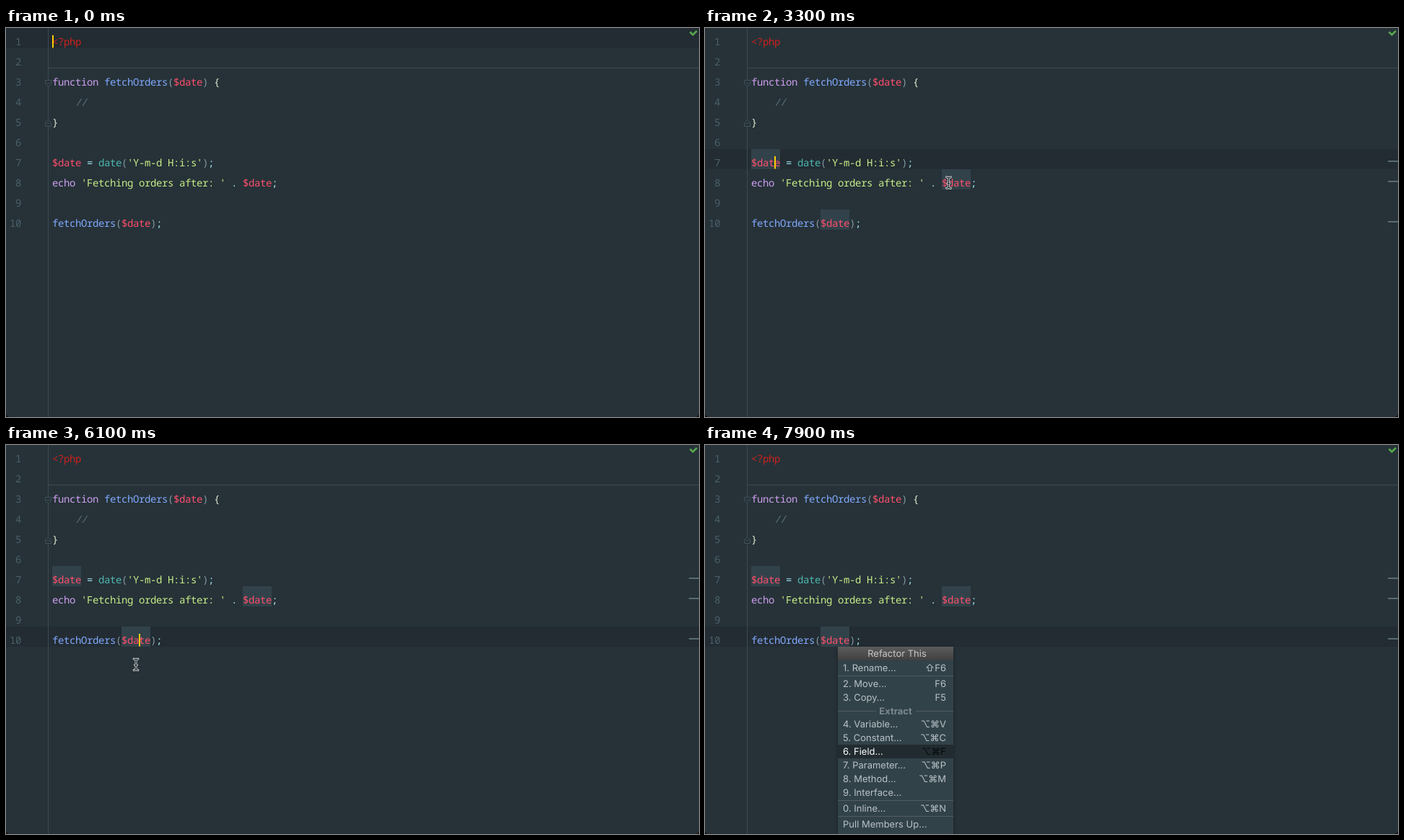
Recreate the animation shown at these times as an HTML page. Size 960 by 540 pixels, loop 8 s.

```html
<!DOCTYPE html>
<html lang="en">
<head>
<meta charset="utf-8">
<title>Refactoring in a code editor</title>
<style>
html, body { margin: 0; height: 100%; overflow: hidden; background: #263238; }
svg { display: block; width: 100vw; height: 100vh; }
text { white-space: pre; text-rendering: geometricPrecision; }
.code { font: 14px "Noto Sans Mono", "DejaVu Sans Mono", monospace; letter-spacing: -.4px; }
.ui { font: 13px Inter, "DejaVu Sans", sans-serif; }
</style>
</head>
<body>
<svg id="stage" viewBox="0 0 960 540">
  <defs>
    <linearGradient id="bar" x2="0" y2="1">
      <stop stop-color="#5c5c5c"/><stop offset="1" stop-color="#414141"/>
    </linearGradient>
    <filter id="shadow" x="-10%" y="-10%" width="120%" height="120%">
      <feDropShadow dx="0" dy="2" stdDeviation="3" flood-opacity=".35"/>
    </filter>
  </defs>
  <rect width="960" height="540" fill="#263238"/>
  <rect id="row" width="960" height="28" fill="#222c32"/>
  <path d="M58.5 0V540M58 55.5H960" stroke="#3c4a51" fill="none"/>
  <g fill="#263238" stroke="#42525a">
    <path d="M54.5 72.5h8v5l-4 3.500-4-3.500zM56.500 76.500h4"/>
    <path d="M54.500 136.500h8v-5l-4-3.500-4 3.500zM56.500 132.500h4"/>
  </g>
  <g id="uses"></g>
  <g id="code" class="code"></g>
  <path d="M947.500 5.500l4 4 5.500-5.500" fill="none" stroke="#58a84c" stroke-width="2.600"/>
  <rect id="caret" width="2" height="17.500" fill="#ffcc00"/>
  <g id="menu" class="ui"></g>
  <g id="keys">
    <rect x="443" y="409" width="71.500" height="57.500" rx="7" fill="#0f1416"/>
    <path d="M456 436l9-8.500 9 8.500" fill="none" stroke="#f4f4f4" stroke-width="2"/>
    <text x="494" y="447.500" text-anchor="middle" fill="#f4f4f4" style="font:300 30px Inter, sans-serif">T</text>
  </g>
  <g id="mouse" fill="none" stroke-linecap="round"></g>
  <path d="M0 535a5 5 0 0 0 5 5H0zM960 535a5 5 0 0 1-5 5h5z" fill="#0b0e10"/>
</svg>
<script>
const byId = id => document.getElementById(id);
const [row, uses, code, caret, menu, keys, mouse] =
  ['row', 'uses', 'code', 'caret', 'menu', 'keys', 'mouse'].map(byId);

function add(parent, tag, attrs, text = '') {
  const node = document.createElementNS('http://www.w3.org/2000/svg', tag);
  for (const name in attrs) node.setAttribute(name, attrs[name]);
  node.textContent = text;
  return parent.appendChild(node);
}
const show = (node, on) => node.style.display = on ? '' : 'none';

// Source code with syntax colours
const lines = [
  '<?php', '', 'function fetchOrders($date) {', '    //', '}', '',
  "$date = date('Y-m-d H:i:s');",
  "echo 'Fetching orders after: ' . $date;", '', 'fetchOrders($date);'
];
const syntax = /(<\?php)|(\/\/)|('[^']*')|(\$\w+)|(function|echo)|(fetchOrders)|(date)|([()])|([{}])|([=.;])/g;
const colors = ['#d0201c', '#5c727d', '#c9ee88', '#ff4f6c', '#cf9ff0', '#82aaff',
  '#4db8b0', '#84979f', '#e2ead2', '#a0e2ee'];

lines.forEach((line, i) => {
  const y = i * 28 + 24;
  add(code, 'text', { x: 21, y, 'text-anchor': 'end', fill: '#4b606a' }, i + 1);
  for (const m of line.matchAll(syntax)) {
    const kind = m.slice(1).findIndex(Boolean);
    add(code, 'text', {
      x: 64 + m.index * 8, y, fill: colors[kind],
      'font-style': kind === 1 ? 'italic' : 'normal'
    }, m[0]);
  }
});

for (const [line, col] of [[7, 0], [8, 33], [10, 12]]) {
  const y = line * 28 - 28;
  add(uses, 'rect', { x: 64 + col * 8, y, width: 40, height: 28, fill: '#32424a' });
  add(uses, 'rect', { x: 946, y: y + 16, width: 14, height: 2, fill: '#596b73' });
}

// Popup menu: centre line, label, shortcut
const items = [
  [309, '1. Rename...', '⇧F6'], [331, '2. Move...', 'F6'], [350, '3. Copy...', 'F5'],
  [387, '4. Variable...', '⌥⌘V'], [406, '5. Constant...', '⌥⌘C'], [425, '6. Field...', '⌥⌘F'],
  [444, '7. Parameter...', '⌥⌘P'], [463, '8. Method...', '⌥⌘M'], [482, '9. Interface...', ''],
  [504, '0. Inline...', '⌥⌘N'], [526, 'Pull Members Up...', '']
];
add(menu, 'rect', { x: 184, y: 280, width: 160, height: 270, fill: '#31424a', filter: 'url(#shadow)' });
add(menu, 'rect', { x: 184, y: 280, width: 160, height: 18.5, fill: 'url(#bar)' });
add(menu, 'path', {
  d: 'M184 320.5h160M184 369.5h53M292 369.5h52M184 493.5h160M184 515.5h160', stroke: '#505c61'
});
const pick = add(menu, 'rect', { x: 184, width: 160, height: 19, fill: '#212b30' });
add(menu, 'text', { x: 266, y: 294, 'text-anchor': 'middle', fill: '#c8c8c8' }, 'Refactor This');
add(menu, 'text', { x: 264, y: 374, 'text-anchor': 'middle', fill: '#7c898f', 'font-weight': 700 }, 'Extract');
const labels = items.map(([mid, label, shortcut]) => [
  add(menu, 'text', { x: 191, y: mid + 5 }, label),
  add(menu, 'text', { x: 334, y: mid + 5, 'text-anchor': 'end' }, shortcut)
]);

// I-beam pointer: light outline around a dark core
const beam = 'M-3-7.500Q0-7.500 0-5Q0-7.500 3-7.500M0-5V5.500M-3 8Q0 8 0 5.500Q0 8 3 8M-1.500 1H1.500';
add(mouse, 'path', { d: beam, stroke: '#d8dcde', 'stroke-width': 2.8 });
add(mouse, 'path', { d: beam, stroke: '#11181b', 'stroke-width': 1.1 });

// Timeline
const blinks = [100, 600, 1100, 1600, 2100, 2200, 2700, 3200, 4000, 4500, 5600, 6100, 6600];
const clicks = [[0, 1, 0], [2200, 7, 4], [3500, 8, 34], [4700, 10, 15]]; // time, line, column
const picks = [[0, 0], [7300, 1], [7500, 2], [7630, 3], [7760, 4], [7890, 5]];
const route = [[1100, 256, 5], [1500, 189.5, 95], [1900, 115, 165], [2300, 97, 189],
  [2600, 97, 189], [3300, 337.5, 214.5], [3500, 337.5, 219], [3850, 337.5, 219],
  [4300, 214.5, 261], [4700, 184.5, 273], [5250, 184.5, 273], [5600, 180, 304.5], [8000, 180, 304.5]];

const latest = (list, t) => list.filter(step => step[0] <= t).pop();
const clamp = v => Math.max(0, Math.min(1, v));

function draw(t) {
  const [, line, col] = latest(clicks, t);
  const top = line * 28 - 28;
  row.setAttribute('y', top);
  caret.setAttribute('x', 64 + col * 8);
  caret.setAttribute('y', top + 10);
  show(caret, blinks.filter(b => b <= t).length % 2 === 0);
  show(uses, t >= 2600);

  show(mouse, t >= 1100 && t < 6300);
  const from = latest(route, t);
  if (from) {
    const to = route[route.indexOf(from) + 1];
    const k = clamp((t - from[0]) / (to[0] - from[0]));
    const at = i => from[i] + (to[i] - from[i]) * k;
    mouse.setAttribute('transform', `translate(${at(1)} ${at(2)})`);
  }

  show(menu, t >= 6400);
  const chosen = latest(picks, t)[1];
  pick.setAttribute('y', items[chosen][0] - 9);
  labels.forEach(([label, shortcut], i) => {
    label.setAttribute('fill', i === chosen ? '#fff' : '#b9c3c7');
    shortcut.setAttribute('fill', i === chosen ? '#05080a' : '#b9c3c7');
  });
  keys.style.opacity = clamp((t - 6200) / 200) * clamp((7900 - t) / 380);
}

const start = performance.now();
(function tick() {
  draw((performance.now() - start) % 8000);
  requestAnimationFrame(tick);
})();
</script>
</body>
</html>
```
